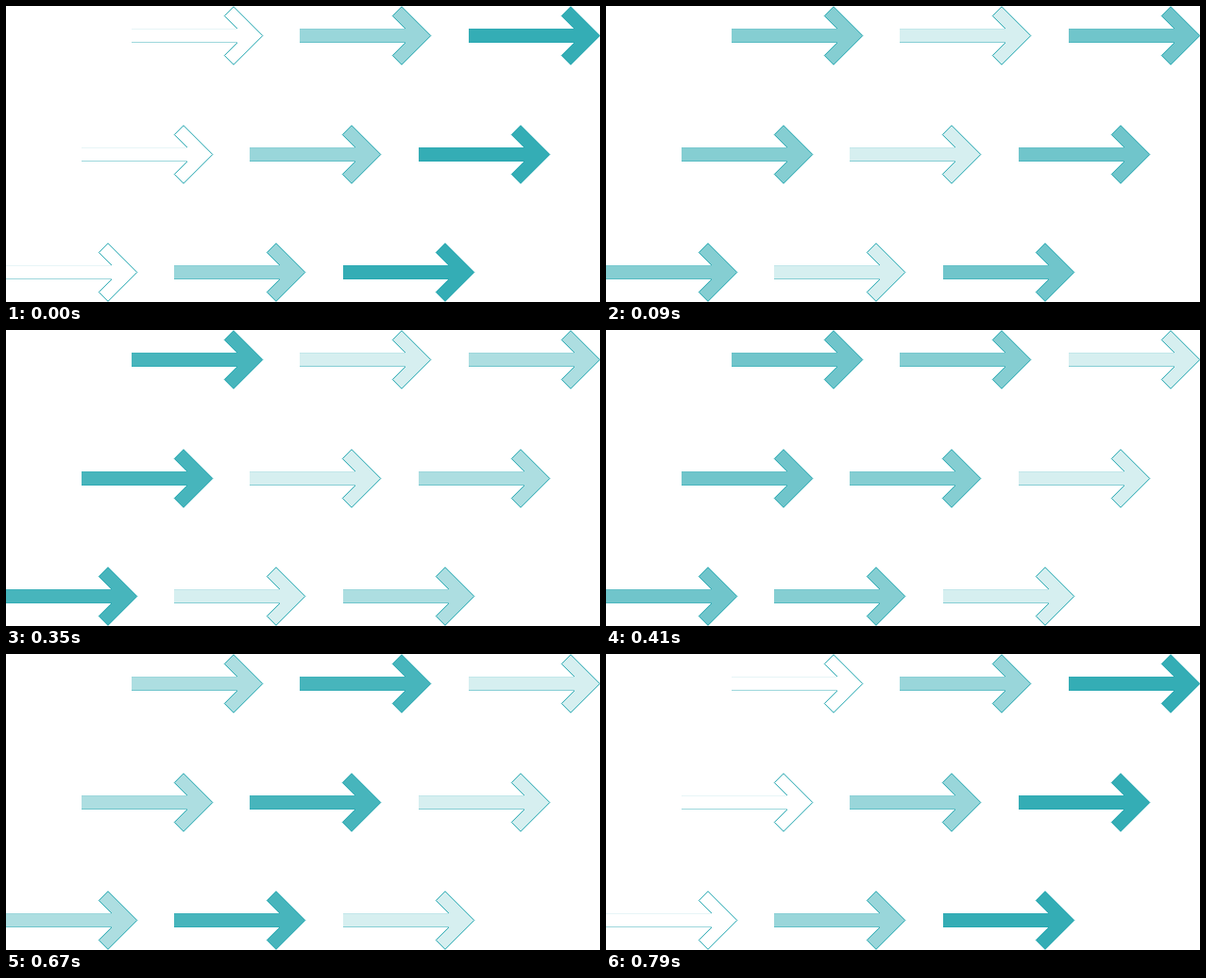
An HTML page that plays this animation: 629x314 px, repeating every 0.92 s.

```html
<!DOCTYPE html>
<html lang="en">
<head>
<meta charset="utf-8">
<title>Arrows</title>
<style>
  html, body { margin: 0; width: 100%; height: 100%; overflow: hidden; background: #fff; }
  svg { display: block; width: 629px; height: 314px; }

  .col {
    fill: #34adb5;
    stroke-linejoin: round;
    /* five equal jumps, 30 ms apart, in each 120 ms fade */
    animation: fade 920ms steps(4, jump-both) infinite;
  }
  .left   { --a: 0;  --b: 1;  --c: .5; }
  .middle { --a: .5; --b: 0;  --c: 1; }
  .right  { --a: 1;  --b: .5; --c: 0; }

  .edge   { fill: none; stroke: #16a1ab; }
  .top    { stroke-opacity: .1; }
  .bottom { stroke-opacity: .42; }

  @keyframes fade {
    0%, 3.2065%        { fill-opacity: var(--a); }
    16.25%, 37.989%    { fill-opacity: var(--b); }
    51.0326%, 72.7717% { fill-opacity: var(--c); }
    85.8152%, 100%     { fill-opacity: var(--a); }
  }
</style>
</head>
<body>
<svg viewBox="0 0 629 314">
  <defs>
    <!-- origin at the point of the arrow; the shaft has fainter edges than the head -->
    <g id="arrow">
      <path d="M-139-7.5H-27.2L-40.7-21L-31-30.8L-.2 0L-31 30.8L-40.7 21L-27.2 7.5H-139Z"/>
      <path class="edge" d="M-27.2-7.5L-40.7-21L-31-30.8L-.2 0L-31 30.8L-40.7 21L-27.2 7.5"/>
      <path class="edge top" d="M-139-7H-27"/>
      <path class="edge bottom" d="M-139 7H-27"/>
    </g>
    <g id="stack">
      <use href="#arrow" x="272" y="31.5"/>
      <use href="#arrow" x="219" y="157.5"/>
      <use href="#arrow" x="139" y="282.5"/>
    </g>
  </defs>
  <g class="col left"><use href="#stack"/></g>
  <g class="col middle"><use href="#stack" x="178"/></g>
  <g class="col right"><use href="#stack" x="357"/></g>
</svg>
</body>
</html>
```
